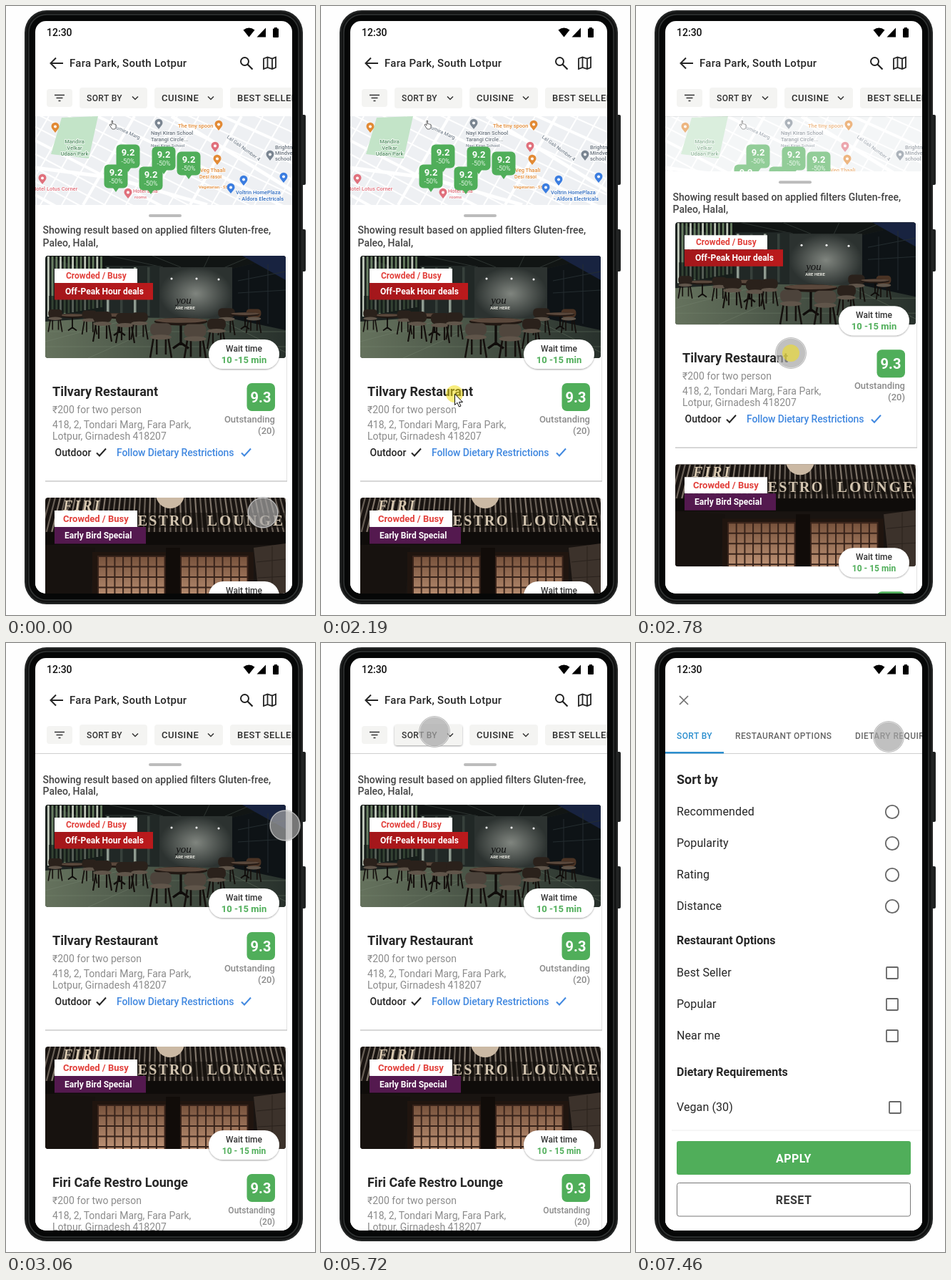
Animation of 433 by 851 pixels, one loop 8000 ms. Source, as an HTML page:

```html
<!DOCTYPE html>
<html lang="en">
<head>
<meta charset="utf-8">
<title>Restaurant finder</title>
<style>
html, body { margin: 0; width: 100%; height: 100%; overflow: hidden; background: #fefefe; }
svg { display: block; width: 433px; height: 851px; font-family: Roboto, sans-serif; }
text { white-space: pre; }
</style>
</head>
<body>
<svg id="stage" viewBox="0 0 433 851" xmlns="http://www.w3.org/2000/svg"></svg>
<script>
const GREEN = '#50ae5a', INK = '#262626', GREY = '#8b8b8b', BLUE = '#4289e0';

const text = (x, y, s, size, weight = 400, fill = INK, extra = '') =>
  `<text x="${x}" y="${y}" font-size="${size}" font-weight="${weight}" fill="${fill}" ${extra}>${s}</text>`;
const rect = (x, y, w, h, fill, r = 0, extra = '') =>
  `<rect x="${x}" y="${y}" width="${w}" height="${h}" rx="${r}" fill="${fill}" ${extra}/>`;
const circle = (x, y, r, fill, extra = '') =>
  `<circle cx="${x}" cy="${y}" r="${r}" fill="${fill}" ${extra}/>`;
const poly = (pts, fill) => `<polygon points="${pts}" fill="${fill}"/>`;
const line = (d, color, w = 1, extra = '') =>
  `<path d="${d}" fill="none" stroke="${color}" stroke-width="${w}" ${extra}/>`;
const group = (x, y, body, extra = '') => `<g transform="translate(${x} ${y})" ${extra}>${body}</g>`;
const repeat = (n, f) => Array.from({ length: n }, (_, i) => f(i)).join('');
const MID = 'text-anchor="middle"', END = 'text-anchor="end"';
const space = v => `letter-spacing="${v}"`;

const gradient = (id, from, to, dir = '') =>
  `<linearGradient id="${id}" ${dir}><stop stop-color="${from}"/><stop offset="1" stop-color="${to}"/></linearGradient>`;
const defs = `<defs>
  <clipPath id="screen"><rect x="41" y="21" width="360" height="800" rx="15"/></clipPath>
  <clipPath id="mapClip"><rect id="mapRect" x="41" y="154" width="360" height="124"/></clipPath>
  <clipPath id="photo"><rect width="337" height="143" rx="4"/></clipPath>
  <filter id="soft" x="-20%" y="-40%" width="140%" height="190%">
    <feDropShadow dx="0" dy="1" stdDeviation="1.3" flood-opacity=".38"/></filter>
  <radialGradient id="wall"><stop stop-color="#80857f"/><stop offset="1" stop-color="#2c3230"/></radialGradient>
  ${gradient('floor', '#65725d', '#28312c')}
  ${gradient('red', '#a3171b', '#bb1a1c')}
  ${gradient('glow', '#75503a', '#bd9275', 'x2="0" y2="1"')}
</defs>`;

function phone() {
  return rect(412, 152, 8, 98, '#1f2121', 2) + rect(412, 312, 8, 59, '#1f2121', 2) +
    rect(26, 6, 390, 830, '#232525', 31) +
    rect(28.500, 8.500, 385, 825, '#111212', 28.500) +
    rect(32, 12, 378, 818, '#060707', 25, 'stroke="#323535" stroke-width="1.500"') +
    rect(41, 21, 360, 800, '#fff', 15);
}

function statusBar() {
  return text(57, 42, '12:30', 14, 500, '#111') +
    `<path d="M332.500 33.500Q340.500 27.500 348.500 33.500L340.500 43.500Z"/>` +
    `<path d="M364 30.500V43.500H351.500Z"/>` +
    rect(374, 31.500, 8, 12.500, '#000', 1) + rect(376, 30, 4, 3, '#000');
}

function header() {
  const chevron = x => line(`M${x - 4} 126.500l4 4l4 -4`, '#333', 1.500);
  const chip = (x, y, w, h) => rect(x, y, w, h, '#f4f4f2', 4);
  return line('M80 80H63M70 72.500L62.500 80L70 87.500', INK, 2) +
    text(89, 85, 'Fara Park, South Lotpur', 15, 500, INK, space(.3)) +
    circle(334.500, 77.500, 5.500, 'none', 'stroke="#222" stroke-width="2"') + line('M338.500 81.500L345.500 88.500', '#222', 2.200) +
    line('M361 73.500L366.500 71.500L373 73.500L378 71.500V86L373 88L366.500 86L361 88ZM366.500 71.500V86M373 73.500V88', '#222', 1.800) +
    chip(57, 116, 36, 25) + line('M68 124.500H82M70.500 128.500H79.500M73.500 132.500H76.500', '#333', 1.600) +
    `<g id="sortChip">${chip(103, 114, 95, 29)}</g>` +
    text(113, 132.500, 'SORT BY', 12, 500, '#333', space(.4)) + chevron(181) +
    chip(208, 114, 96, 29) + text(218, 133, 'CUISINE', 13, 500, '#2c2c2c', space(.5)) + chevron(287) +
    chip(314, 114, 110, 29) + text(324, 133, 'BEST SELLER', 13, 500, '#2c2c2c', space(.5)) +
    line('M41 154.500H401', '#cfcfcf');
}

function map() {
  const ORANGE = '#e28a35', SLATE = '#7a8591', PINK = '#e0707c', SKY = '#3b7de0';
  const label = (x, y, s, fill, size = 7.500, extra = '') =>
    text(x, y, s, size, 500, fill, `stroke="#fff" stroke-width="1.5" paint-order="stroke" ${extra}`);
  const place = (x, y, c) =>
    `<path d="M${x} ${y + 8}l-4 -5a5.500 5.500 0 1 1 8 0z" fill="${c}"/>` + circle(x, y - .5, 2, '#fff');
  const score = (x, y) => group(x, y,
    `<path d="M-5 15h10l-5 7z" fill="${GREEN}"/>` + rect(-16.500, -16.500, 33, 33, GREEN, 6) +
    text(0, -1, '9.2', 13, 700, '#fff', MID) + text(0, 9.500, '-50%', 9, 400, '#dcf1de', MID));
  return rect(41, 154, 360, 124, '#eef0f3') +
    repeat(19, i => line(`M41 ${-40 + i * 19}l360 ${150 + i * 3}`, '#fff', i % 4 ? 2 : 4)) +
    repeat(16, i => line(`M${30 + i * 30} 154l-72 124`, '#fff', i % 5 ? 2 : 4)) +
    line('M41 226L150 240L282 278M232 154L401 258', '#fff', 5) +
    poly('78,156 129,154 116,213 63,207', '#c3e4c8') +
    ['Mandira', 'Velkar', 'Udaan Park'].map((s, i) => label(96, 192 + i * 8.500, s, '#4c8a5c', 7.500, MID)).join('') +
    place(69, 169, ORANGE) + label(150, 170, 'Sumira Marg', SLATE, 7, 'transform="rotate(24 150 170)"') +
    place(214, 164, SLATE) + label(203, 180, 'Nayi Kiran School', '#68727d') +
    label(203, 189, 'Tarangi Circle...', '#68727d') + label(203, 196.500, 'Nayi Kiran School', SLATE, 6) +
    label(241, 170, 'The tiny spoon', ORANGE) + place(298, 166, ORANGE) + place(293, 196, PINK) +
    label(309, 184, 'Lal Gali Number 4', SLATE, 7, 'transform="rotate(36 309 184)"') +
    place(370, 208, SLATE) + ['Brightm', 'Mindvel', 'school'].map((s, i) => label(377, 200 + i * 8, s, '#68727d')).join('') +
    place(296, 214, ORANGE) + label(272, 232, 'Veg Thaali', ORANGE) + label(271, 241, 'Desi rasoi', ORANGE, 7) +
    label(270, 255, 'Vegetarian - SS', ORANGE, 6) +
    place(333, 243, SKY) + place(315, 254, SKY) + place(389, 239, SKY) +
    label(322, 263, 'Voltrin HomePlaza', '#2f6cc0') + label(326, 272, '- Aldora Electricals', '#2f6cc0') +
    place(51, 241, PINK) + label(37, 258, 'Hotel Lotus Corner', PINK) +
    place(171, 261, PINK) + label(178, 261, 'Hotel Bela', PINK) + label(180, 269, 'rooms', PINK, 6) +
    `<path d="M148 171l-3 -5l1.500 -1l1.500 2v-6.500h1.500v4l4.500 1v4l-1.500 2.500h-3.500z" fill="#fff" stroke="#444" stroke-width=".8"/>` +
    [[171, 210], [221, 213], [256, 220], [154, 238], [203, 241]].map(p => score(...p)).join('');
}

function diningRoom() {
  const table = (x, y, s) => group(x, y, `<g transform="scale(${s})">` +
    line('M0 2V30M-10 34L0 27L10 34', '#0f0c0a', 3) +
    `<ellipse rx="34" ry="5" fill="#211813"/><ellipse cy="-1.500" rx="33" ry="3" fill="#5a483c"/></g>`);
  const chair = (x, y, s, c = '#2a211b') => group(x, y, `<g transform="scale(${s})">` +
    line('M-9 6L-13 30M9 6L13 30M-5 6V26M6 6V26', '#15100d', 2.200) +
    rect(-13, -12, 26, 15, c, 6) + `<ellipse cy="5" rx="13" ry="3" fill="#60554a"/></g>`);
  return rect(0, 0, 337, 143, '#1e2422') +
    poly('0,0 337,0 262,18 160,16 60,20', '#111514') +
    line('M90 0L165 16M230 0L222 17M150 0L190 16M290 0L250 17', '#2d3431') +
    repeat(14, i => rect(3 + i * 5.700, 1, 2.800, 84 - i, i % 3 ? '#76906f' : '#dfe8d8', 0, 'opacity=".85"')) +
    rect(5, 56, 78, 24, '#121a15', 0, 'opacity=".6"') +
    rect(84, 14, 78, 76, '#212826') + repeat(4, i => rect(86 + i * 19, 16, 3.500, 68, i % 2 ? '#37403b' : '#8e9a90')) +
    rect(160, 16, 102, 74, 'url(#wall)') +
    circle(177, 32, 1.500, '#fff') + circle(212, 32, 1.500, '#fff') + circle(243, 33, 1.500, '#fff') +
    text(194, 67, 'you', 15, 400, '#111', `${MID} font-family="Liberation Serif, serif" font-style="italic"`) +
    text(196, 75, 'ARE HERE', 6, 700, '#e8e8e0', MID) +
    poly('262,18 337,0 337,108 262,90', '#0e1316') + poly('276,0 337,0 337,34', '#182340') +
    line('M270 35L337 22M270 52L337 48M285 20V90M312 12V95', '#242d30') +
    poly('0,92 90,86 262,88 337,104 337,143 0,143', 'url(#floor)') +
    line('M0 120L120 88M60 143L180 90M230 143L215 92M337 135L250 92M0 106H337M0 127H337', '#7d8a77', .7, 'opacity=".5"') +
    table(38, 84, .6) + chair(14, 84, .75) + chair(62, 86, .8) + table(104, 84, .8) + chair(80, 90, 1) +
    chair(112, 92, 1) + chair(132, 90, .9) + chair(254, 84, .9) + chair(292, 84, .8, '#4a3324') + table(280, 82, .6) +
    table(190, 92, 1.100) + chair(162, 108, 1.150, '#4c433b') + chair(210, 110, 1.200, '#50463d') + chair(240, 100, 1);
}

function loungeFront() {
  const serif = 'font-family="Liberation Serif, serif"';
  const pane = x => rect(x, 81, 94, 62, 'url(#glow)') +
    repeat(9, i => line(`M${x + i * 11.700} 81V143`, '#38231a', 2)) +
    repeat(5, i => line(`M${x} ${82 + i * 14.500}h94`, '#38231a', 2));
  return rect(0, 0, 337, 143, '#191411') +
    repeat(50, i => {
      const x = i * 7;
      return line(`M${x} 0L${x + (x - 168) * .08} 48`, '#93887b', 2.200, `opacity="${i % 3 ? .65 : .85}"`);
    }) +
    rect(110, 21, 227, 21, '#15100d', 0, 'opacity=".5"') +
    circle(175, -5, 20, '#cbb9a4') +
    text(25, 18, 'FIRI', 20, 700, '#d8c8b0', `${serif} ${space(3)} font-style="italic"`) +
    text(113, 39, 'RESTRO', 20, 700, '#d3c5b0', `${serif} ${space(2.200)}`) +
    text(227, 39, 'LOUNGE', 21, 700, '#d3c5b0', `${serif} ${space(3)}`) +
    poly('0,48 337,48 337,66 0,66', '#0f0c0a') + poly('0,66 70,70 62,143 0,143', '#17120f') +
    poly('292,70 337,64 337,143 300,143', '#3c322b') + line('M296 90L337 86M298 112L337 110M318 68V143', '#2a221d') +
    rect(66, 76, 226, 67, '#20150f') +
    pane(74) + pane(190) + rect(169, 70, 20, 73, '#110c09');
}

function card(y, c) {
  const tick = (x, color) => line(`M${x} 275.500l4 4l9 -10`, color, 2);
  return group(0, y,
    rect(55, 0, 338, 315, '#fff') + line('M393.500 2V315', '#e2e2e2') + line('M55 315H394', '#cacaca', 1.300) +
    group(55, 0, c.photo(), 'clip-path="url(#photo)"') +
    rect(68, 18, 116, c.split - 18, '#fff') +
    text(c.busyX, c.split - 6.500 + (c.tag - 12) * -.5, 'Crowded / Busy', c.tag, 700, '#e2403b') +
    rect(68, c.split, c.dealW, 23.500, c.dealFill) + text(c.dealX, c.split + 15.500, c.deal, 12, 700, '#fff') +
    rect(284, 117, 99, 41, '#fff', 20.500, 'filter="url(#soft)"') +
    text(333.500, 133.500, 'Wait time', 12, 500, '#333', MID) +
    text(333.500, 150, c.wait, c.waitSize, 700, GREEN, MID) +
    text(65, 196, c.name, 18, 700) +
    text(65, 220, '₹200 for two person', 14, 400, GREY) +
    text(65, 241, '418, 2, Tondari Marg, Fara Park,', 14, 400, GREY) +
    text(65, 257, 'Lotpur, Girnadesh 418207', 14, 400, GREY) +
    rect(337.500, 178, 39.500, 39, GREEN, 7) + text(357, 205, '9.3', 20, 700, '#fff', MID) +
    text(377, 233, 'Outstanding', c.note, 500, GREY, END) + text(377, 249, '(20)', c.note, 500, GREY, END) +
    text(68.500, 280, 'Outdoor', 14, 500) + tick(127, INK) +
    text(155, 280, 'Follow Dietary Restrictions', 14, 500, BLUE, space(-.12)) + tick(330, BLUE));
}

function results() {
  const filters = (id, y, s) => `<g id="${id}">${text(51.500, y, s, 14, 500, '#444')}</g>`;
  return rect(41, 278, 360, 900, '#fff') + rect(200, 291, 46, 4, '#bcbcbc', 2) +
    filters('row1', 318, 'Showing result based on applied filters Gluten-free,') + filters('row2', 336, 'Paleo, Halal,') +
    card(349, { photo: diningRoom, split: 38, tag: 12, busyX: 84, deal: 'Off-Peak Hour deals', dealX: 83, dealW: 138,
      dealFill: 'url(#red)', wait: '10 -15 min', waitSize: 13, name: 'Tilvary Restaurant', note: 13 }) +
    card(687, { photo: loungeFront, split: 41, tag: 13, busyX: 80, deal: 'Early Bird Special', dealX: 82, dealW: 128,
      dealFill: '#54194f', wait: '10 - 15 min', waitSize: 12, name: 'Firi Cafe Restro Lounge', note: 12 });
}

function filterSheet() {
  const tab = (x, s, c) => text(x, 134, s, 12, 500, c, space(.4));
  const head = (y, s, size = 16) => text(57, y, s, size, 700);
  const ring = 'stroke="#666" stroke-width="1.800"';
  const radio = (s, i) => text(57, 241 + i * 44, s, 16, 400, INK, space(.1)) + circle(359, 236 + i * 44, 9.200, 'none', ring);
  const box = (s, y, x = 359) => text(57, y, s, 16, 400, INK, space(.1)) + rect(x - 8, y - 13, 16, 16, 'none', 1, ring);
  return rect(41, 50, 360, 771, '#fff') + line('M61 74L73 86M73 74L61 86', '#707070', 1.700) +
    tab(57, 'SORT BY', '#2c8fcf') + tab(139, 'RESTAURANT OPTIONS', '#666') + tab(307, 'DIETARY REQUIREMENTS', '#666') +
    line('M41 154.500H401', '#cfcfcf') + rect(41, 152, 82, 2.500, '#2c8fcf') +
    head(197, 'Sort by', 18) + ['Recommended', 'Popularity', 'Rating', 'Distance'].map(radio).join('') +
    head(421, 'Restaurant Options') + box('Best Seller', 466) + box('Popular', 510) + box('Near me', 554) +
    head(605, 'Dietary Requirements') + box('Vegan (30)', 654, 363) + line('M50 681H401', '#ececec') +
    rect(57, 696, 328, 47, GREEN, 3) + text(221, 725.500, 'APPLY', 16, 700, '#fff', `${MID} ${space(.4)}`) +
    rect(57.500, 754.500, 327, 46.500, '#fff', 3, 'stroke="#777"') + text(221, 783.500, 'RESET', 16, 700, '#3a3a3a', `${MID} ${space(.5)}`);
}

const pointer =
  `<g id="touch">${circle(0, 0, 21.500, '#a6a6a6', 'fill-opacity=".7" stroke="#8e8e8e" stroke-opacity=".5"')}` +
  `${circle(0, 0, 20.700, 'none', 'stroke="#fff" stroke-opacity=".55"')}</g>` +
  `<g id="press">${circle(0, 0, 12, '#f2de14', 'fill-opacity=".55"')}</g>` +
  `<path id="arrow" d="M.5 0V15.500L4 12.300L6.500 18L9 17L6.500 11.500H11.500Z" fill="#fff" stroke="#111"/>`;

const stage = document.getElementById('stage');
stage.innerHTML = defs + phone() +
  `<g clip-path="url(#screen)">${statusBar()}${header()}` +
  `<g clip-path="url(#mapClip)"><g id="map">${map()}</g></g>` +
  `<g id="results">${results()}</g>` +
  `<g id="sheet">${filterSheet()}</g></g><g id="pointer">${pointer}</g>`;
const el = Object.fromEntries([...stage.querySelectorAll('[id]')].map(e => [e.id, e]));

const clamp = v => Math.min(1, Math.max(0, v));
const ease = {
  lin: u => u, in: u => u * u * u, out: u => u * (2 - u), both: u => u * u * (3 - 2 * u)
};
// tick, x, y, easing used to get there
const PATH = [
  [14, 360, 708], [20, 186, 547, 'both'], [27, 186, 547], [28, 186, 551], [29, 187, 542], [33, 187, 542],
  [42, 217, 485, 'in'], [44, 279, 378], [46, 391, 255], [54, 391, 255], [61, 155, 196, 'both'], [70, 155, 196],
  [73, 158, 210], [80, 158, 210], [86, 159, 124, 'both'], [99, 159, 124], [106, 289, 135, 'both'], [112, 354, 131, 'out']
];
const LOOP = 8000, TICKS_PER_MS = .015;

function pointerAt(n) {
  const i = PATH.findIndex(k => k[0] >= n);
  if (i < 1) return (i ? PATH[PATH.length - 1] : PATH[0]).slice(1, 3);
  const a = PATH[i - 1], b = PATH[i];
  const u = ease[b[3] || 'lin']((n - a[0]) / (b[0] - a[0]));
  return [a[1] + (b[1] - a[1]) * u, a[2] + (b[2] - a[2]) * u];
}

const move = (e, x, y) => e.setAttribute('transform', `translate(${x} ${y})`);
const show = (e, on) => e.setAttribute('visibility', on ? 'visible' : 'hidden');

function draw(ms) {
  const n = Math.floor((ms + 20) * TICKS_PER_MS);
  const [x, y] = pointerAt(n);
  move(el.pointer, x, y);

  const arrow = n >= 29 && n <= 33;
  show(el.arrow, arrow);
  show(el.touch, !arrow);
  show(el.press, (n >= 32 && n < 44) || (n >= 92 && n < 95));

  // the results follow the drag
  const p = n < 33 ? 0 : n >= 44 ? 1 : clamp((542 - y) / 150);
  move(el.results, 0, -123 * p);
  move(el.row1, 0, p);
  move(el.row2, 0, -p);
  el.map.setAttribute('opacity', 1 - p);
  el.mapRect.setAttribute('height', 124 - 123 * p);

  const hover = n >= 84;
  el.sortChip.setAttribute('filter', hover ? 'url(#soft)' : 'none');

  const fade = clamp((n - 94) / 6);
  el.sheet.setAttribute('opacity', fade);
  show(el.sheet, fade > 0);
}

const start = performance.now();
function frame() {
  draw((performance.now() - start) % LOOP);
  requestAnimationFrame(frame);
}
draw(0);
frame();
</script>
</body>
</html>
```
